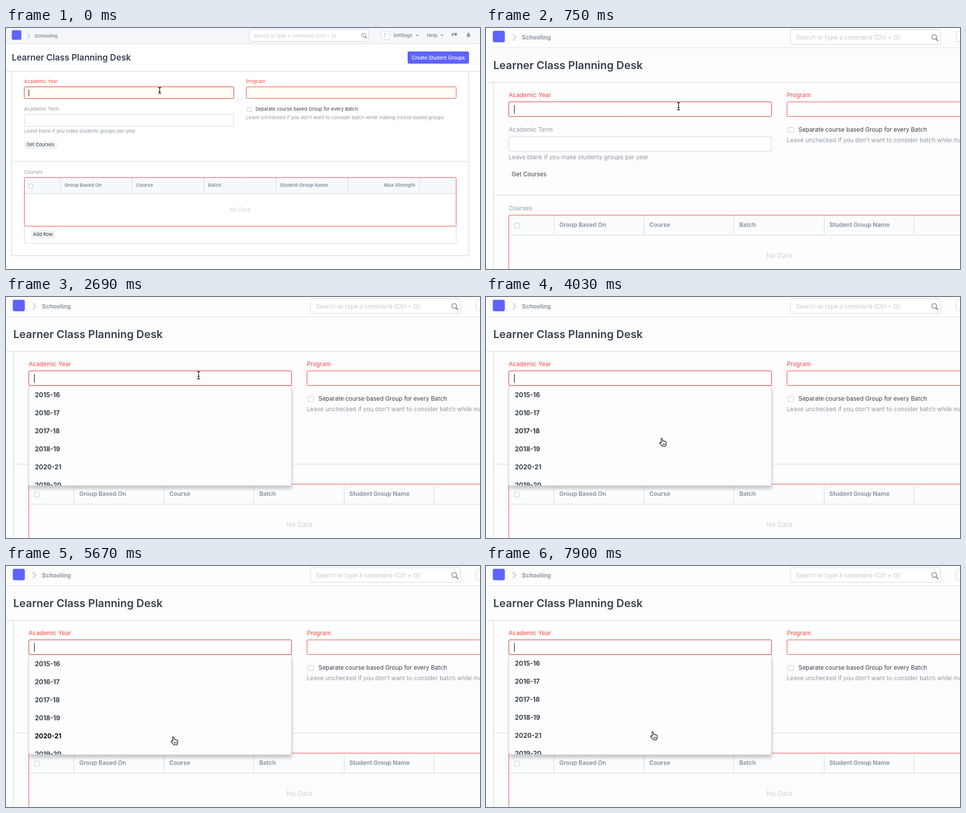
Write an HTML page with a canvas that moves like this. It is 944 px wide and 481 px high and loops after 8 s.

```html
<!DOCTYPE html>
<html lang="en">
<head>
<meta charset="utf-8">
<title>Learner Class Planning Desk</title>
<style>
html, body { margin: 0; width: 100%; height: 100%; overflow: hidden; background: #fff; }
canvas { display: block; }
</style>
</head>
<body>
<canvas id="stage" width="944" height="481"></canvas>
<script>
const ctx = document.getElementById('stage').getContext('2d');
const LOOP = 8000, ZOOM_AT = 300, MENU_AT = 890, SCROLL_AT = 7900, ZOOM = 1.2535;
const CARET_TOGGLES = [300, 750, 1190, 1790, 2240, 2690, 3290, 3740, 4180, 4770, 5220, 5670, 6270, 6710, 7160, 7760];
// [start, x, y] of the pointing hand
const HAND = [[3880, 356, 252], [4030, 345, 281], [4180, 335, 310], [4320, 328, 340],
  [6560, 328.5, 327], [6710, 328, 327], [7160, 327, 328], [7310, 327, 330]];
// [start, highlighted row]
const HOVER = [[4030, 2], [4180, 3], [4320, -1], [4470, 4], [6560, -1]];
const YEARS = ['2015-16', '2016-17', '2017-18', '2018-19', '2020-21', '2019-20'];
const COLUMNS = [108, 251, 394, 537, 680, 823];
const INK = '#36414c', MUTED = '#8d99a6', LINE = '#d1d8dd', RED = '#ee4a46', FOCUS = '#e8463f', BLUE = '#5e64ff';
const handShape = new Path2D('M4.4 9.6L3.7 2.4Q3.6 1 4.8.9Q6 .8 6.3 2.2L7 6.5Q8.3 5.7 9.4 6.9Q10.9 6.2 11.9 7.6Q13.9 7.1 14.2 9.1L14.2 12Q13.8 14.2 12.8 16.8L6 16.8Q4.8 14.2 1.2 11.2Q.4 9.2 2 8.9Q3.2 8.8 4.4 9.6Z');
const handLines = new Path2D('M7.5 11V14.4M9.6 11V14.4M11.7 11V14.4');

let k = 1; // current page scale
const snap = v => Math.floor(v * k);
const latest = (list, t) => list.filter(e => t >= e[0]).pop();

function text(str, x, yMid, { size = 9.43, weight = 400, color = MUTED, align = 'left' } = {}) {
  ctx.font = `${weight} ${size * k}px Inter, sans-serif`;
  ctx.fillStyle = color;
  ctx.textAlign = align;
  ctx.fillText(str, x * k, (yMid + size * 0.364) * k);
}

function box(x1, y1, x2, y2, { fill, stroke, r = 0, width = 1 }) {
  const x = snap(x1) + 0.5, y = snap(y1) + 0.5;
  ctx.beginPath();
  ctx.roundRect(x, y, snap(x2) + 0.5 - x, snap(y2) + 0.5 - y, r * k);
  if (fill) { ctx.fillStyle = fill; ctx.fill(); }
  if (stroke) { ctx.strokeStyle = stroke; ctx.lineWidth = width; ctx.stroke(); }
}

function fillRect(x1, y1, x2, y2, color) {
  ctx.fillStyle = color;
  ctx.fillRect(snap(x1), snap(y1), snap(x2) - snap(x1), snap(y2) - snap(y1));
}

function hLine(x1, x2, y, color = LINE) {
  ctx.fillStyle = color;
  ctx.fillRect(snap(x1), snap(y), snap(x2) - snap(x1) + 1, 1);
}

function vLine(x, y1, y2, color = LINE) {
  ctx.fillStyle = color;
  ctx.fillRect(snap(x), snap(y1), 1, snap(y2) - snap(y1) + 1);
}

// Polyline in page units
function poly(points, color, { fill = false, width = 1 } = {}) {
  ctx.beginPath();
  for (let i = 0; i < points.length; i += 2) ctx.lineTo(points[i] * k, points[i + 1] * k);
  if (fill) { ctx.fillStyle = color; ctx.fill(); }
  else { ctx.strokeStyle = color; ctx.lineWidth = width * k; ctx.stroke(); }
}

function topBar() {
  box(11, 4, 30, 23, { fill: BLUE, r: 3 });
  poly([42.5, 10, 47.5, 15, 42.5, 20], '#b4bcc4', { width: 1.1 });
  text('Schooling', 57, 15.1, { weight: 700 });
  box(484, 2.5, 722.6, 26.2, { fill: '#fff', stroke: LINE, r: 2 });
  text('Search or type a command (Ctrl + G)', 492.5, 15.1, { size: 9.5, color: '#c3c8cd' });
  ctx.beginPath();
  ctx.arc(712.2 * k, 14.3 * k, 3.8 * k, 0, 7);
  ctx.strokeStyle = '#6c7680';
  ctx.lineWidth = k;
  ctx.stroke();
  poly([715, 17.2, 718.5, 20.8], '#6c7680', { width: 1.5 });
  box(747.4, 6, 763, 22, { fill: '#fff', stroke: LINE, r: 2 });
  text('E', 755.5, 14.5, { size: 10, color: '#b8c0c8', align: 'center' });
  text('Settings', 771, 14.5, { weight: 700 });
  text('Help', 838, 14.5, { weight: 700 });
  for (const x of [819, 868]) poly([x - 3, 13.5, x + 3, 13.5, x, 16.5], MUTED, { fill: true });
  box(887, 10, 893, 14, { fill: MUTED, r: 1 });
  poly([888, 13, 888, 17, 891, 14], MUTED, { fill: true });
  box(891, 9, 898, 14, { fill: MUTED, stroke: '#f5f7fa', r: 1 });
  poly([893, 13, 897, 13, 897, 17], MUTED, { fill: true });
  poly([916.5, 17, 918, 15, 918.5, 11.5, 920, 9.5, 922, 9.5, 923.5, 11.5, 924, 15, 925.5, 17], MUTED, { fill: true });
  fillRect(920, 17.5, 922.5, 19, MUTED);
  hLine(0, 944, 31.4, '#dce1e4');
}

function heading() {
  text('Learner Class Planning Desk', 11.5, 59, { size: 17.2, weight: 600, color: INK });
  box(800, 47, 921, 70, { fill: BLUE, stroke: '#444bff', r: 2 });
  text('Create Student Groups', 861, 59, { size: 9.7, weight: 500, color: '#fff', align: 'center' });
  hLine(0, 944, 86.4);
}

function form(zoomed) {
  const fieldFill = zoomed ? '#fdfdfd' : '#fffdf4';
  vLine(11.6, 87, 454);
  vLine(921, 87, 454);
  hLine(11.6, 921, 266);
  hLine(11.6, 921, 454);

  text('Academic Year', 36, 106.6, { color: RED });
  box(36, 117.4, 453.8, 140.9, { stroke: 'rgba(120,90,90,.12)', r: 2, width: 4 });
  box(36, 117.4, 453.8, 140.9, { fill: fieldFill, stroke: FOCUS, r: 2 });
  text('Academic Term', 36, 161.7);
  box(36, 172.9, 453.8, 196.4, { fill: zoomed ? '#fdfdfd' : '#fff', stroke: LINE, r: 2 });
  text('Leave blank if you make students groups per year', 36, 205.8);
  if (!zoomed) box(36, 225, 101, 241, { fill: '#f0f4f7', r: 2 });
  text('Get Courses', 40.7, 232.9, { color: INK });

  text('Program', 478, 106.6, { color: RED });
  box(478, 117.4, 896, 140.9, { fill: fieldFill, stroke: RED, r: 2 });
  box(480, 158, 488.5, 166, { fill: '#fff', stroke: '#c0c6cc', r: 1.5 });
  text('Separate course based Group for every Batch', 496.5, 162, { color: INK });
  text("Leave unchecked if you don't want to consider batch while making course based groups.", 478, 178.7);
}

function table(zoomed) {
  text('Courses', 36, 287.2);
  box(36, 298, 896, 429.9, { stroke: LINE });
  fillRect(36, 298, 897, 330, zoomed ? '#fbfcfd' : '#f5f9fc');
  hLine(36, 896, 330);
  COLUMNS.forEach(x => vLine(x, 298, 330));
  box(36, 298, 896, 395, { stroke: RED, r: 2 });
  box(45, 311, 53.4, 319, { fill: '#fff', stroke: '#c0c6cc', r: 1.5 });
  ['Group Based On', 'Course', 'Batch', 'Student Group Name'].forEach((name, i) =>
    text(name, COLUMNS[i] + 8.4, 313.5, { weight: 700 }));
  text('Max Strength', 815, 313.5, { weight: 700, align: 'right' });
  text('No Data', 466, 362.4, { size: 10.8, color: '#d0d4d8', align: 'center' });
  box(49, 403, 97, 420, { fill: '#f0f4f7', r: 2 });
  text('Add Row', 53.5, 411.8, { color: INK });
}

// The open list and pointers below are laid out in stage pixels.
function menu(t) {
  const scroll = t >= SCROLL_AT ? 1 : 0;
  const hover = latest(HOVER, t)?.[1] ?? -1;
  ctx.save();
  ctx.shadowColor = 'rgba(0,0,0,.2)';
  ctx.shadowBlur = 6;
  ctx.shadowOffsetX = 1;
  ctx.shadowOffsetY = 6;
  ctx.fillStyle = '#fdfdfd';
  ctx.beginPath();
  ctx.roundRect(45, 178, 524, 199, [0, 0, 4, 4]);
  ctx.fill();
  ctx.restore();
  ctx.strokeStyle = '#cdd5d8';
  ctx.lineWidth = 1;
  ctx.beginPath();
  ctx.roundRect(45.5, 177.5, 523, 199, [0, 0, 4, 4]);
  ctx.stroke();
  hLine(37, 453, 140.9, FOCUS);

  ctx.save();
  ctx.beginPath();
  ctx.rect(46, 178, 522, 198);
  ctx.clip();
  ctx.font = '700 12.8px Inter, sans-serif';
  ctx.textAlign = 'left';
  YEARS.forEach((year, i) => {
    ctx.fillStyle = i === hover ? (t < 4180 ? '#262d34' : '#000') : INK;
    ctx.fillText(year, 57.5, 200 + 36 * i - scroll);
  });
  ctx.restore();
}

function iBeam(x, y, height) {
  ctx.beginPath();
  ctx.moveTo(x - 3, y);
  ctx.quadraticCurveTo(x, y, x, y + 2.5);
  ctx.lineTo(x, y + height - 2.5);
  ctx.quadraticCurveTo(x, y + height, x - 3, y + height);
  ctx.moveTo(x + 3, y);
  ctx.quadraticCurveTo(x, y, x, y + 2.5);
  ctx.moveTo(x, y + height - 2.5);
  ctx.quadraticCurveTo(x, y + height, x + 3, y + height);
  ctx.moveTo(x - 2, y + height * 0.64);
  ctx.lineTo(x + 2, y + height * 0.64);
  ctx.strokeStyle = '#111';
  ctx.lineWidth = 1.2;
  ctx.stroke();
}

function pointer(t) {
  const hand = latest(HAND, t);
  if (!hand) return iBeam(306 * k, 118.6 * k, 12 * k);
  ctx.save();
  ctx.translate(hand[1], hand[2]);
  ctx.lineJoin = 'round';
  ctx.fillStyle = '#fff';
  ctx.fill(handShape);
  ctx.strokeStyle = '#111';
  ctx.lineWidth = 1.2;
  ctx.stroke(handShape);
  ctx.lineWidth = 0.9;
  ctx.stroke(handLines);
  ctx.restore();
}

function draw() {
  const t = performance.now() % LOOP;
  const zoomed = t >= ZOOM_AT;
  k = zoomed ? ZOOM : 1;
  ctx.fillStyle = zoomed ? '#fdfdfd' : '#fff';
  ctx.fillRect(0, 0, 944, 481);
  if (!zoomed) fillRect(0, 0, 944, 31, '#f5f7fa');
  topBar();
  heading();
  form(zoomed);
  table(zoomed);
  if (t >= MENU_AT) menu(t);
  if (CARET_TOGGLES.filter(at => t >= at).length % 2 === 0) vLine(45, 123, 135.8, '#000');
  pointer(t);
  requestAnimationFrame(draw);
}
draw();
</script>
</body>
</html>
```
